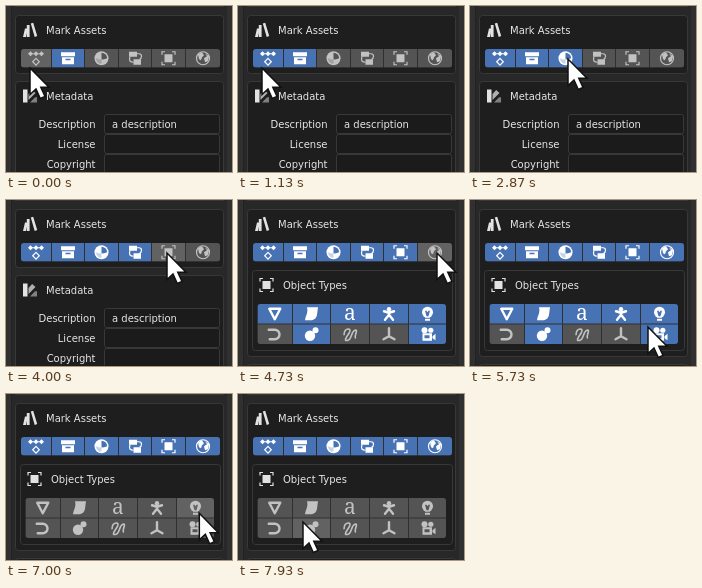
Recreate the animation shown at these times as an HTML page. Size 226 by 166 pixels, loop 8 s.

```html
<!DOCTYPE html>
<html lang="en">
<head>
<meta charset="utf-8">
<title>Mark Assets</title>
<style>
  html, body { margin: 0; width: 100%; height: 100%; overflow: hidden; background: #303030; }
  svg { display: block; width: 100vw; height: 100vh; }
  text { font: 10px "DejaVu Sans", sans-serif; fill: #e6e6e6; }
  .end { text-anchor: end; }
  .box { fill: #1e1e1e; stroke: #383838; }
  .field { fill: #1b1b1b; stroke: #383838; }
  .icon { color: #e2e2e2; }
  .thin { fill: none; stroke: currentColor; stroke-width: 1.2; }
  .line { fill: none; stroke: currentColor; stroke-width: 1.6; }
  .thick { fill: none; stroke: currentColor; stroke-width: 2.4; stroke-linecap: round; stroke-linejoin: round; }
  .gap { fill: #303030; }
  .button { --face: #545454; color: #c2c2c2; }
  .button.hover { --face: #626262; }
  .button.on { --face: #4772b3; color: #fff; }
  .button > rect, .cut { fill: var(--face); }
  .icon, .button g { fill: currentColor; }
  .button text { font: 21px "Noto Serif", serif; fill: currentColor; text-anchor: middle; }
</style>
</head>
<body>
<svg viewBox="0 0 226 166" preserveAspectRatio="none">
  <defs>
    <clipPath id="markClip"><rect x="15" y="43" width="199" height="18.5" rx="3"/></clipPath>
    <clipPath id="typeClip"><rect x="19.5" y="104" width="188.5" height="40" rx="3"/></clipPath>
  </defs>
  <rect width="226" height="166" fill="#303030"/>
  <path d="M5 0H221V166H5z" fill="#282828"/>
  <path d="M5.5 0V166" stroke="#222"/>
  <path d="M9 .5H218" stroke="#383838"/>
  <rect id="outer" class="box" x="9.5" y="9.5" width="208" rx="3"/>

  <g class="icon" transform="translate(24 24)">
    <path d="M-7 7L-5-1.5h2.6L-4 7zM-3.2 7V-5h2.8V7zM.8-6.5l2.4-.8L7.2 6l-2.5.9z"/>
  </g>
  <text x="40" y="28">Mark Assets</text>

  <g id="metadata">
    <rect class="box" x="9.5" y="75.5" width="208" height="100" rx="3"/>
    <g class="icon" transform="translate(24 90)">
      <path d="M-7-6.5h4.5v13H-7z"/>
      <path d="M-1.5-2L2.2-6 5.5-3-1.5 4z" opacity=".75"/>
      <path d="M0 6.5L5 1.3h2v5.2z" opacity=".5"/>
    </g>
    <text x="40" y="94">Metadata</text>
    <rect class="field" x="98.5" y="108.5" width="115" height="19" rx="2"/>
    <rect class="field" x="98.5" y="128.5" width="115" height="19" rx="2"/>
    <rect class="field" x="98.5" y="148.5" width="115" height="19" rx="2"/>
    <text class="end" x="89.5" y="122">Description</text>
    <text class="end" x="89.5" y="142">License</text>
    <text class="end" x="89.5" y="162">Copyright</text>
    <text x="106" y="122">a description</text>
  </g>

  <g id="types">
    <rect class="box" x="14.5" y="70.5" width="200" height="80" rx="3"/>
    <g class="icon" id="typeIcon" transform="translate(28.5 85)"></g>
    <text x="45" y="89">Object Types</text>
    <g id="typeButtons" clip-path="url(#typeClip)"><path class="gap" d="M19 104H209V144H19z"/></g>
    <rect class="box" x="9.5" y="164.5" width="208" height="20" rx="3"/>
  </g>
  <g id="markButtons" clip-path="url(#markClip)"><path class="gap" d="M15 43H214V62H15z"/></g>

  <path id="pointer" d="M0 0V26.5L6 21 10.3 30.5 15 28.4 10.8 19.3H19z" fill="#fff" stroke="#111" stroke-width="1.5"/>
</svg>
<script>
const LOOP = 8000, RATE = 15, NEVER = Infinity;
const $ = id => document.getElementById(id);
const diamond = (x, y, r) => `M${x} ${y - r}l${r} ${r} ${-r} ${r} ${-r} ${-r}z`;

const icons = {
  action: `<path d="${diamond(-5.5, -4.5, 2.5)}${diamond(0, -4.5, 2.5)}${diamond(5.5, -4.5, 2.5)}M-5-5H5v1H-5z"/>
    <path class="thin" d="${diamond(0, 3.5, 3.3)}"/>`,
  archive: `<path d="M-7-6H7v4H-7zM-6-1H6v7H-6z"/><path class="cut" d="M-2.5.5h5v1.6h-5z"/>`,
  material: `<circle r="7"/><path class="cut" d="M0-5.6A5.6 5.6 0 0 1 5.6 0Q3 1.5 0 1z"/>
    <path class="cut" opacity=".3" d="M0 5.6A5.6 5.6 0 0 1-5.6 0Q-3 1.5 0 1z"/>`,
  nodes: `<path d="M-6-6.5H2v5h-8zM-1.5 1H6v5.5h-7.5z"/>
    <path class="thin" d="M2-4.5H4Q6.5-4.5 6.5-2T4.5 1M-5-1.5Q-7 4-1.5 4"/>`,
  object: `<path d="M-4-4H4V4H-4z"/>
    <path class="thin" d="M-6.5-3.5v-3h3M3.5-6.5h3v3M6.5 3.5v3h-3M-3.5 6.5h-3v-3"/>`,
  world: `<circle class="thin" r="6.5"/><path d="M-5-4L-1-6 1-3-1-1-2 2-4 1zM2-5L6-2 5 3 2 4 1 0 4-2z"/>`,
  mesh: `<path class="thick" d="M-5.5-5H5.5L0 5.5z"/>`,
  surface: `<path d="M-4.5-6.5H6.5L5.5 1C5 4 3 6.5-1 6.5h-5.5C-6 2-3-1-4.5-6.5z"/>`,
  font: `<text y="6">a</text>`,
  armature: `<circle cy="-4.5" r="2.2"/><path class="thick" d="M-5-2.5L0-1 5-2.5M0-2V1L-4 6M0 1L4 6"/>`,
  light: `<circle cy="-1.5" r="5.5"/><path d="M-2.5 3h5v4h-5z"/>
    <path class="cut" d="M-2.5-3h1.5L0-1.5 1-3h1.5L1 2.5H-1zM-2.5 4h5v.9h-5z"/>`,
  curve: `<path class="thick" d="M-6-4.5H0a4.6 4.6 0 0 1 0 9.5H-5"/>`,
  meta: `<circle cx="-1.5" cy="1.5" r="5.2"/><circle cx="4" cy="-4" r="3"/>`,
  hair: `<path class="line" d="M-6 1C-6-7 3-7-1-1S-6 7-2 6 1-3 5-4 3 3 6 4"/>`,
  empty: `<path class="thick" d="M0-6V2L-5.5 5M0 2L5.5 5"/>`,
  camera: `<circle cx="-3" cy="-4" r="3"/><circle cx="3.3" cy="-4" r="2.6"/>
    <path d="M-5-1H4.5V6.5H-5zM5 2L8-.5V6L5 4z"/><path class="cut" d="M-3 1h5v3h-5z"/>`
};

// name: [tick switched on, tick switched off]
const marks = { action: [17, NEVER], archive: [0, NEVER], material: [37, NEVER],
  nodes: [54, NEVER], object: [61, NEVER], world: [75, NEVER] };
const upperTypes = { mesh: [0, 97], surface: [0, 99], font: [0, 101], armature: [0, 102], light: [0, 104] };
const lowerTypes = { curve: [NEVER, 0], meta: [0, 95], hair: [NEVER, 0], empty: [NEVER, 0], camera: [0, 105] };
const TYPES_SHOWN = 61;

// pointer path: tick, x, y
const path = [
  [0, 24, 62], [20, 24, 62], [27, 84, 55], [29, 84, 55], [30, 82, 54], [36, 82, 54],
  [39, 90, 54], [42, 90, 54], [43, 98, 53], [50, 126, 53], [53, 126, 53], [60, 161, 53],
  [66, 161, 53], [71, 199, 53], [81, 199, 53], [86, 178, 127], [92, 72, 135], [94, 72, 135],
  [95, 66, 135], [98, 38, 116], [104, 190, 116], [107, 200, 126], [113, 88, 128],
  [116, 88, 128], [119, 65, 128], [120, 65, 128]
];

const buttons = [];
function addRow(parent, states, edges, y, height) {
  Object.entries(states).forEach(([name, [on, off]], i) => {
    const x = edges[i], width = edges[i + 1] - x;
    const node = document.createElementNS("http://www.w3.org/2000/svg", "g");
    node.innerHTML = `<rect x="${x}" y="${y}" width="${width - 1}" height="${height}"/>
      <g transform="translate(${x + width / 2 - .5} ${y + height / 2})">${icons[name]}</g>`;
    $(parent).append(node);
    buttons.push({ node, on, off, x, y, width, height, from: parent === "typeButtons" ? TYPES_SHOWN : 0 });
  });
}
const typeEdges = [19.5, 55, 93, 132, 171, 209];
addRow("markButtons", marks, [15, 46, 79, 113, 146, 180, 215], 43, 18.5);
addRow("typeButtons", upperTypes, typeEdges, 104, 19.5);
addRow("typeButtons", lowerTypes, typeEdges, 124.5, 19.5);
$("typeIcon").innerHTML = icons.object;

function pointerAt(tick) {
  const next = path.findIndex(key => key[0] > tick);
  const [t0, x0, y0] = path[next - 1], [t1, x1, y1] = path[next];
  const k = (tick - t0) / (t1 - t0);
  return [x0 + (x1 - x0) * k, y0 + (y1 - y0) * k];
}

function draw(now) {
  const tick = Math.floor(((now % LOOP) + 4) * RATE / 1000) % (LOOP * RATE / 1000);
  const [px, py] = pointerAt(tick);
  const open = tick >= TYPES_SHOWN;
  $("pointer").setAttribute("transform", `translate(${px} ${py})`);
  $("types").style.display = open ? "" : "none";
  $("metadata").style.display = open ? "none" : "";
  $("outer").setAttribute("height", open ? 147 : 58);
  for (const b of buttons) {
    const hover = tick >= b.from && px >= b.x && px < b.x + b.width && py >= b.y && py <= b.y + b.height + .6;
    const on = tick >= b.on && tick < b.off;
    b.node.setAttribute("class", `button${on ? " on" : ""}${hover ? " hover" : ""}`);
  }
}

const start = performance.now();
function loop() {
  draw(performance.now() - start);
  requestAnimationFrame(loop);
}
loop();
</script>
</body>
</html>
```
